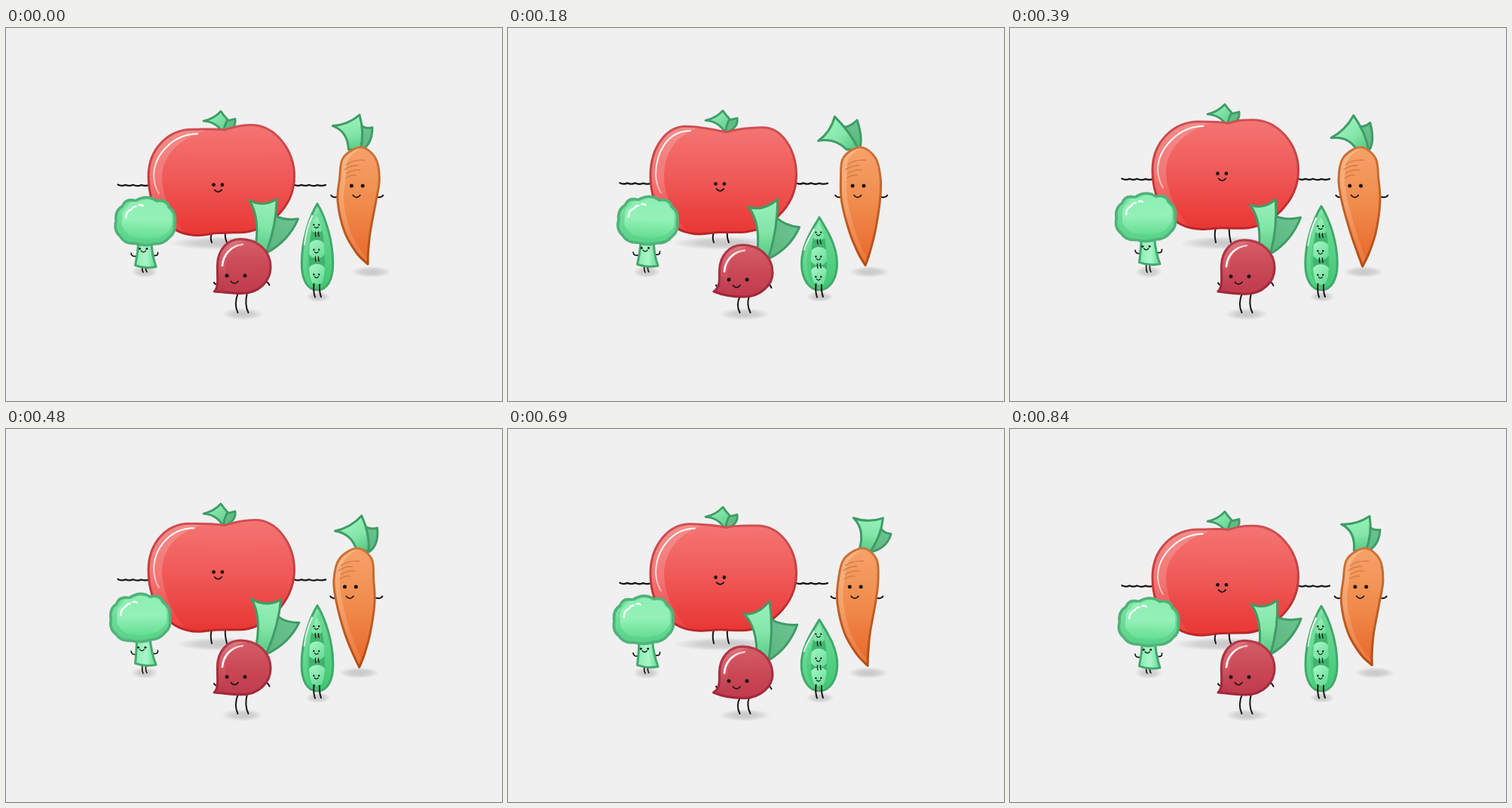
Animation, 658 px wide and 494 px high, one loop 870 ms. Source, as an HTML page with a canvas:

```html
<!DOCTYPE html>
<html lang="en">
<head>
<meta charset="utf-8">
<title>Dancing vegetables</title>
<style>
html, body { margin: 0; width: 100%; height: 100%; overflow: hidden; background: #f0f0f0; }
canvas { display: block; }
</style>
</head>
<body>
<canvas id="stage" width="658" height="494"></canvas>
<script>
const ctx = document.getElementById('stage').getContext('2d');
const LOOP = 870, STEP = 30, INK = '#1b1516';
const LEAF_LINE = '#3f9c65';
let time = 0;

// Periodic motion: one swing or two swings per loop, highest at `peak` ms
const wave = (mean, amp, peak, period = LOOP) =>
  mean + amp * Math.cos(2 * Math.PI * (time - peak) / period);
const half = (mean, amp, peak) => wave(mean, amp, peak, LOOP / 2);
const mix = (a, b, k) => [a[0] + (b[0] - a[0]) * k, a[1] + (b[1] - a[1]) * k];
const shift = (p, x, y) => [p[0] + x, p[1] + y];

function grad(x0, y0, x1, y1, ...colors) {
  const g = ctx.createLinearGradient(x0, y0, x1, y1);
  colors.forEach((c, i) => g.addColorStop(i / (colors.length - 1), c));
  return g;
}

function line(d, width = 2, color = INK) {
  ctx.lineWidth = width;
  ctx.strokeStyle = color;
  ctx.stroke(new Path2D(d));
}

function fill(d, paint, edge, width = 3) {
  const p = new Path2D(d);
  ctx.fillStyle = paint;
  ctx.fill(p);
  if (edge) {
    ctx.lineWidth = width;
    ctx.strokeStyle = edge;
    ctx.stroke(p);
  }
}

function dot(x, y, r, paint = INK) {
  ctx.beginPath();
  ctx.arc(x, y, r, 0, 7);
  ctx.fillStyle = paint;
  ctx.fill();
}

function clipped(d, draw) {
  ctx.save();
  ctx.clip(new Path2D(d));
  draw();
  ctx.restore();
}

// Body with a light rim on its left side
function body(d, light, main, edge, dx, dy, width) {
  fill(d, light);
  clipped(d, () => {
    ctx.translate(dx, dy);
    fill(d, main);
  });
  line(d, width, edge);
}

function shadow(x, y, rx, ry) {
  ctx.save();
  ctx.translate(x, y);
  ctx.scale(rx, ry);
  const g = ctx.createRadialGradient(0, 0, 0, 0, 0, 1);
  g.addColorStop(0, 'rgba(0,0,0,.17)');
  g.addColorStop(.5, 'rgba(0,0,0,.13)');
  g.addColorStop(1, 'rgba(0,0,0,0)');
  dot(0, 0, 1, g);
  ctx.restore();
}

function face(x, y, gap, r, sx, sy, sw, width) {
  dot(x - gap, y, r);
  dot(x + gap, y, r);
  line(`M${x + sx - sw} ${y + sy}q${sw} ${sw * 1.2} ${sw * 2} 0`, width);
}

// Two leaves on one base: l and m are the corners of the front one, r the tip of the back one
function leaves(l, m, r, b, w) {
  const s = shift(mix(m, b, .32), 5, 0);
  const sr = mix(mix(s, r, .5), b, .1);
  const rb = shift(mix(r, shift(b, w, 2), .5), 8, 7);
  fill(`M${b}L${s}Q${sr} ${r}Q${rb} ${shift(b, w, 2)}Z`,
    grad(...r, ...b, '#6cc591', '#58b47d'), LEAF_LINE);
  const lm = mix(mix(l, m, .5), b, .16);
  const mb = shift(mix(m, b, .5), 10, 0);
  const bl = mix(mix(l, b, .5), m, .27);
  fill(`M${l}Q${lm} ${m}Q${mb} ${shift(b, w, 0)}L${shift(b, -w, 0)}Q${bl} ${l}Z`,
    grad(...mix(l, m, .5), ...b, '#96f0b8', '#84e6a8', '#58cb86'), LEAF_LINE);
}

function tomato() {
  shadow(285, 285, wave(65, -5, 455), 9);

  const ay = wave(203.8, 4.3, 25);
  const arm = 'q5 2.6 10 .2q5 2.4 10 0q6 2.6 11 .2q5 2 11 0';
  line(`M148.5 ${ay - .5}${arm}M382 ${ay - .5}${arm}`, 2.3);

  const ly = wave(105, 6.1, 75);
  fill(`M290 ${ly + 13}Q297 ${ly + 12} 304 ${ly + 10}Q306 ${ly + 23} 289 ${ly + 29}Z`,
    '#5fbd85', LEAF_LINE, 2.8);
  fill(`M285 ${ly}Q289 ${ly + 6} 294 ${ly + 11}Q290 ${ly + 18} 288 ${ly + 29}Q279 ${ly + 14} 262 ${ly + 13}Q276 ${ly + 10} 285 ${ly}Z`,
    grad(270, ly, 290, ly + 26, '#96f0b8', '#62d08e'), LEAF_LINE, 2.8);

  const dip = wave(132, 5, 75) + half(0, 2.8, 140);
  const lx = half(243, 7.5, 375), lt = wave(128, 5, 40) + half(0, 2.3, 60);
  const rx = half(330, 9, 150), rt = wave(126.8, 4.5, 60) + half(0, 2.3, 215);
  const bl = wave(270, 4, 60) + half(0, 2.6, 80);
  const br = wave(268, 3, 60) + half(0, 1.2, 100);
  const notch = (bl + br) / 2 - 1.2, sy = wave(192, 5, 60);
  const d = `M289.5 ${dip}C300 ${dip - 3} ${rx - 18} ${rt} ${rx} ${rt}` +
    `C${rx + (382.5 - rx) * .57} ${rt} 382.5 ${sy - 34} 382.5 ${sy}C382.5 ${sy + 43} 343 ${br} 310 ${br}` +
    `C298 ${br} 288 ${notch} 281 ${notch}C274 ${notch} 264 ${bl} 255 ${bl}` +
    `C217 ${bl} 189 ${sy + 47} 189 ${sy}C189 ${sy - 37} ${lx - (lx - 189) * .55} ${lt} ${lx} ${lt}` +
    `C${lx + 15} ${lt} 280 ${dip - 2} 289.5 ${dip}Z`;

  // legs sit behind the body
  line(`M274 ${notch - 2}Q270 ${notch + 6} 273 284M291 ${br - 2}Q290 ${br + 7} 293 284`, 2);
  fill(d, grad(0, rt, 0, bl, '#f48e8b', '#f27674', '#ea403d'));
  clipped(d, () => fill(
    `M${lx + 30} ${lt - 2}C${lx - 15} ${lt + 8} 208 ${sy - 30} 207 ${sy}C207 ${sy + 30} 222 ${bl - 20} 245 ${bl + 5}H400V100Z`,
    grad(0, rt, 0, bl, '#f47573', '#ef5856', '#e83633')));
  line(d, 3, grad(0, rt, 0, bl, '#cf5054', '#b92628'));
  line(`M${lx + 6} ${lt + 6}C${lx - 25} ${lt + 6} 196 ${sy - 30} 196 ${sy}Q197 ${sy + 14} 203 ${sy + 23}`,
    2, grad(0, lt, 0, sy + 24, '#fff', 'rgba(255,255,255,.9)', 'rgba(255,255,255,.45)'));

  face(281.2, wave(199.2, 10, 75), 5.7, 2.4, .2, 6.6, 4.7, 1.8);
}

function broccoli() {
  shadow(184, 323, 18, 8);
  const hx = wave(182, 4.2, 110), hy = wave(253.8, 3.1, 50);
  const foot = wave(314.3, 2, 10), ay = foot - 15, neck = wave(183, 1.4, 110);

  line(`M181 ${foot}Q180 321 182 323.5M185.5 ${foot}Q185 321 187 323`, 1.7);
  line(`M173 ${ay + 1}Q166.5 ${ay + 2} 166 ${ay - 3}M196 ${ay}Q202 ${ay + 1} 201.5 ${ay - 4}`, 1.7);
  fill(`M${neck - 8} ${hy + 25}Q${neck - 9} 298 171.5 ${foot - 2}Q185 ${foot + 3} 199 ${foot}Q193 298 ${neck + 9} ${hy + 25}Z`,
    grad(172, 0, 200, 0, '#8bebb0', '#a8f8c9', '#5cd68d'), '#43a96e', 3);
  face(wave(181.2, 1, 60), wave(290.7, 1.6, 20), 4.7, 1.5, .2, 2.8, 3, 1.4);

  const crown = 'M-14-27.5Q1-37 14-28Q28-31 31-20Q41-14 39 1Q41 13 32 20Q25 29 12 29Q0 33-13 29' +
    'Q-27 30-33 20Q-42 13-39 0Q-41-14-31-20Q-27-31-14-27.5Z';
  ctx.save();
  ctx.translate(hx, hy);
  ctx.rotate(wave(0, .04, 110));
  fill(crown, grad(0, -30, 0, 30, '#80e6a6', '#58d187'), '#50b27a', 3.6);
  ctx.save();
  ctx.translate(2, -3);
  ctx.scale(.84, .82);
  fill(crown, grad(0, -30, 0, 30, '#8eefb3', '#94f1b8', '#66de94'));
  ctx.restore();
  line('M-26-5Q-26-13-19-16Q-17-20-13-20M-9-22Q-6-23-4-21', 2.4, '#fff');
  ctx.restore();
}

function radish() {
  const sq = half(0, 1, 12);
  const top = 283 - 4.5 * sq, low = 355 - 2.6 * sq, tip = 274.5 + 2 * sq;
  shadow(314, 379, 31 - 3.5 * sq, 8);
  leaves([half(319, 7, 70), half(235, 10.3, 275)], [half(355.5, 11, 85), half(227, 1, 290)],
    [half(386.2, 3, 80), half(257.5, 6.5, 165)], [338, top + 17], 8);

  line(`M308 ${low - 2}Q302 366 307.5 377M320 ${low - 2}Q316 366 321.5 377`, 2);
  const ay = 340.5 - 2 * sq;
  line(`M282 ${ay + 2}Q277 ${ay + 1} 276 ${ay - 1.5}M342 ${ay - 3}Q347 ${ay - 4} 349.5 ${ay + 2}`, 2);

  const d = `M${tip} 349C283 343 280 328 280.5 ${top + 35}C281 ${top + 15} 294 ${top + 1} 311 ${top + 1}` +
    `C334 ${top + 1} 351 ${top + 17} 351 ${top + 38}C351 ${low - 17} 335 ${low - 1} 313 ${low - 1}` +
    `C298 ${low - 1} ${tip + 12} ${low - 3} ${tip} 349Z`;
  body(d, grad(0, top, 0, low, '#dd7880', '#cf5561', '#b83349'),
    grad(0, top, 0, low, '#d55e67', '#ca4856', '#be3a4c'),
    grad(0, top, 0, low, '#b33a4a', '#a0273a'), 11, 2, 3.2);
  line(`M287 ${top + 36}C288 ${top + 22} 298 ${top + 10} 314 ${top + 8}`, 2.6,
    grad(287, top + 36, 315, top + 8, '#fff', '#fff', 'rgba(255,255,255,.6)'));
  face(305, 331 - 3 * sq, 12, 2.5, -1.8, 7.5, 4.8, 1.8);
}

function pod() {
  const sq = half(0, 1, 12);
  const top = 243 - 10.3 * sq, w = 22.3 - 1.6 * sq, s = (1 - sq) / 2;
  shadow(414, 356, 17.5 - 1.2 * sq, 7);

  const cy = top + .62 * (312 - top);
  const d = `M413 ${top}C424 ${top + 18} ${413 + w} ${cy} ${413 + w} 312C${413 + w} 332 427 347 413 347` +
    `C399 347 ${413 - w} 332 ${413 - w} 312C${413 - w} ${cy} 402 ${top + 18} 413 ${top}Z`;
  body(d, grad(0, top, 0, 347, '#84e5aa', '#4fce80'),
    grad(0, top, 0, 347, '#72dd9b', '#3fc772'), '#42a86c', 7, 0, 3);

  const ys = [261 + 11.5 * s, 294 + 10.5 * s, 327 + 3.5 * s];
  const up = ys[0] - 12;
  const slot = `M412.5 ${up}C419 ${up + 6} 423 ${cy} 423 312Q423 332 418 340H407Q402 332 402 312C402 ${cy} 406 ${up + 6} 412.5 ${up}Z`;
  fill(slot, '#41b36d');
  clipped(slot, () => ys.forEach((y, i) =>
    dot(412.5, y - 1, 11 + i * 1.3, grad(404, y - 10, 420, y + 10, '#a0f3c1', '#66dc95'))));
  ys.forEach((y, i) => {
    face(411.8, y - .5, 3.4, 1.2, 0, 2.8, 2.5, 1.2);
    if (i < 2) line(`M410.5 ${y + 9}q-.5 3 .5 6M414.5 ${y + 9}q-.5 3 .7 5.6`, 1.4);
  });
  line(`M${416.5 - w} ${cy + 5}Q${419 - w} ${top + 33} 406 ${top + 16}`, 2,
    grad(0, top + 14, 0, cy + 5, '#fff', 'rgba(255,255,255,.75)'));
  line('M408.5 339Q407.5 350 410 356.5M416 340Q415.5 350 418 356', 2);
}

// Smooth open curve through points
function smooth(pts) {
  const at = i => pts[Math.max(0, Math.min(pts.length - 1, i))];
  let d = `M${pts[0]}`;
  for (let i = 0; i < pts.length - 1; i++) {
    const [a, b, c, e] = [at(i - 1), at(i), at(i + 1), at(i + 2)];
    d += `C${shift(b, (c[0] - a[0]) / 6, (c[1] - a[1]) / 6)} ` +
      `${shift(c, (b[0] - e[0]) / 6, (b[1] - e[1]) / 6)} ${c}`;
  }
  return d + 'Z';
}

function carrot() {
  shadow(wave(476.5, 8, 15), 323, 27, 7.5);
  leaves([wave(433.5, 22.5, 660) + half(0, 3.5, 300), wave(135, 17.3, 262)],
    [wave(465.5, 31.5, 664) + half(0, 3.5, 345), half(116.5, 1.6, 250)],
    [wave(485.5, 23.3, 655), wave(130, 9, 680)],
    [wave(466.5, 9.5, 590), 161], 8);

  const hand = wave(430.8, 3, 220);
  line(`M${hand + 10} 223.5Q${hand + 3} 225.5 ${hand + .5} 221.5M${hand + 60} 223.5Q${hand + 67} 225.5 ${hand + 69.5} 221.5`, 2);

  // centre line from shoulder to root: x, y, half width
  const spine = [
    [wave(466, 2.7, 840), 172, 21.4],
    [wave(465.3, 4, 60), 200, 26.4],
    [wave(465, 3, 200), 230, 25.3],
    [wave(466.8, 3.5, 240), 270, 17],
    [wave(470.5, 2.5, 60), 298, 7.6]
  ];
  const tip = [wave(474, 6.3, 835), wave(314.3, 1.5, 400)];
  const left = spine.map(([x, y, w]) => [x - w, y]).reverse();
  const right = spine.map(([x, y, w]) => [x + w, y]);
  const d = smooth([tip, ...left, [wave(468, 3, 800), 158], ...right, tip]);
  body(d, grad(0, 158, 0, 315, '#f9b787', '#f4a06a', '#ea7335'),
    grad(0, 158, 0, 315, '#f6a26a', '#f08a4a', '#e7652a'),
    grad(0, 158, 0, 315, '#cd7438', '#b34c14'), 8, 0, 3);

  const cx = spine[1][0];
  line(`M${cx - 17} 181Q${cx - 8} 174 ${cx + 7} 175M${cx - 20} 187.5Q${cx - 12} 182 ${cx - 2} 182` +
    `M${cx - 17} 192.5Q${cx - 8} 187 ${cx + 1} 188M${cx - 18} 198.5Q${cx - 12} 194 ${cx - 5} 195`,
    1.3, '#cf7a42');
  face(wave(461.5, 4.7, 60), 209, 7.4, 2.5, -.7, 12.5, 4.8, 1.8);
}

function frame() {
  time = Math.floor(performance.now() / STEP) * STEP % LOOP;
  ctx.fillStyle = '#f0f0f0';
  ctx.fillRect(0, 0, 658, 494);
  ctx.lineCap = ctx.lineJoin = 'round';
  tomato();
  broccoli();
  radish();
  pod();
  carrot();
  requestAnimationFrame(frame);
}
frame();
</script>
</body>
</html>
```
